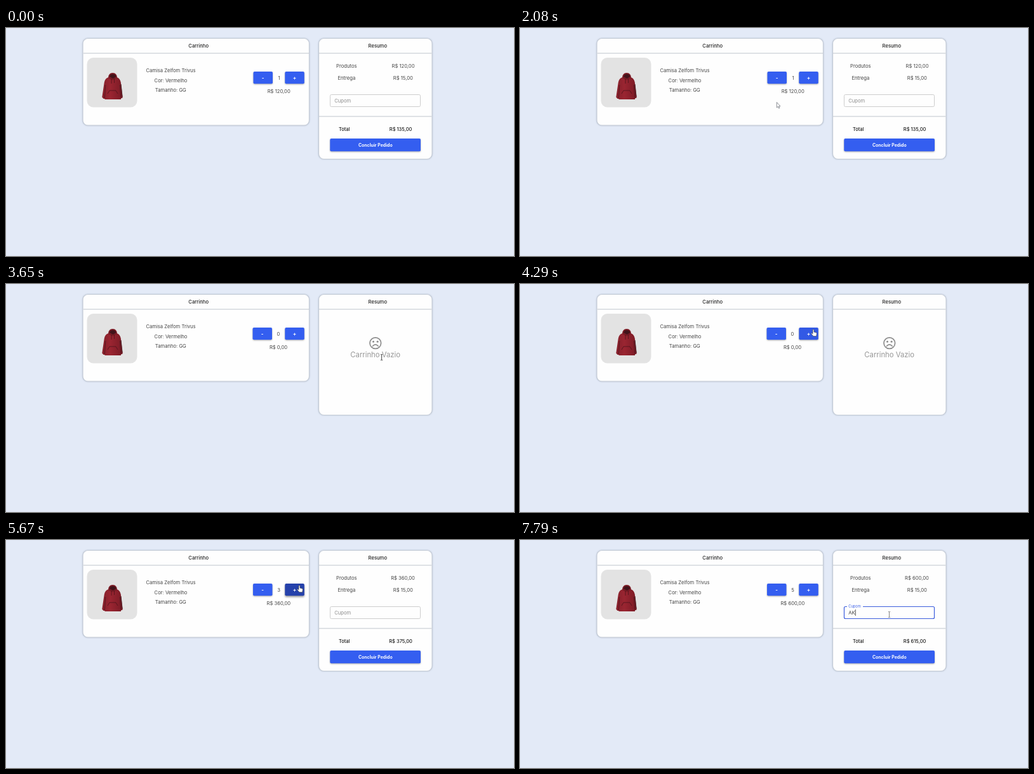
These frames come from a looping animation (800x361 px, 7.99 s). An HTML page:

```html
<!DOCTYPE html>
<html lang="pt-BR">
<head>
<meta charset="utf-8">
<title>Carrinho</title>
<style>
  html, body { margin: 0; width: 100%; height: 100%; overflow: hidden; background: #e3eaf7; }
  svg { display: block; width: 100vw; height: 100vh; }
  text { font: 400 7.65px Inter, Roboto, sans-serif; fill: #454545; text-anchor: middle; }
  .title { font-weight: 500; fill: #222; }
  .strong { font-size: 7.5px; font-weight: 500; fill: #1c1c1c; }
  .label { font-weight: 700; font-size: 6.95px; fill: #fff; }
  .sign { font-weight: 700; font-size: 8px; fill: #fff; }
  .left { text-anchor: start; }
  .card { fill: #fefefe; stroke: #c5ccd7; stroke-width: 1.2; filter: drop-shadow(0 0 1px rgba(90, 105, 130, .3)); }
  .rule { stroke: #d3d7dd; stroke-width: 1.5; }
  .btn { fill: #345ef0; filter: drop-shadow(0 1px 1px rgba(0, 0, 0, .32)); }
  .empty text { font-size: 11.3px; fill: #979797; }
  .empty .face { fill: none; stroke: #8c8c8c; stroke-width: 1.7; stroke-linecap: round; }
</style>
</head>
<body>
<svg viewBox="0 0 800 361" preserveAspectRatio="none">
  <defs>
    <linearGradient id="cloth">
      <stop offset="0" stop-color="#84202b"/>
      <stop offset=".4" stop-color="#9a2531"/>
      <stop offset="1" stop-color="#7a1a25"/>
    </linearGradient>
  </defs>
  <rect width="800" height="361" fill="#e3eaf7"/>

  <!-- cart -->
  <rect class="card" x="121" y="16.5" width="356.5" height="137.7" rx="8"/>
  <path class="rule" d="M121.5 40H477"/>
  <text class="title" x="303.2" y="31.1">Carrinho</text>
  <rect x="127.5" y="47" width="79" height="78.5" rx="10" fill="#e3e3e3"/>
  <g>
    <path fill="url(#cloth)" d="M161.5 78Q156 79.500 154.800 86L151.300 109.500L153.500 112H155.500V113H181V111.500L183.700 110.500L180.800 86Q179.500 79.500 174.500 78Z"/>
    <path fill="#7b1b25" d="M161 79.500Q161 71 168 71Q175 71 175 79.500L168 82.500Z"/>
    <path fill="#42131a" d="M163 77Q164 73 168 73Q172.500 73 173.500 77L168.500 80Z"/>
    <path fill="none" stroke="#4d131b" stroke-width=".8" d="M166 80V88M170.500 80V87M156.800 90L155.300 111M179.300 90L181 111M160 104L163 99H173L176 104"/>
    <path fill="none" stroke="#3c1a20" stroke-width=".9" d="M181 89L183.200 109"/>
  </g>
  <text x="259.5" y="70.3">Camisa Zelfom Trivus</text>
  <text x="259.5" y="85.6">Cor: Vermelho</text>
  <text x="259.3" y="100.8">Tamanho: GG</text>
  <g id="minus">
    <rect class="btn" x="389.500" y="69" width="30.500" height="19.300" rx="2"/>
    <text class="sign" x="404.7" y="81.5">-</text>
  </g>
  <g id="plus">
    <rect class="btn" x="439.300" y="69" width="30.500" height="19.300" rx="2"/>
    <text class="sign" x="454.5" y="81.6">+</text>
  </g>
  <text id="count" y="81.7"></text>
  <text id="price" y="102.600"></text>

  <!-- summary -->
  <rect class="card" x="492.5" y="16.500" width="178.500" height="191" rx="8"/>
  <path class="rule" d="M493 40H670.500"/>
  <text class="title" x="585.3" y="31.1">Resumo</text>
  <g id="full">
    <text x="536.3" y="62.6">Produtos</text>
    <text id="goods" y="62.6"></text>
    <text x="536.3" y="81.6">Entrega</text>
    <text x="625.3" y="81.6">R$ 15,00</text>
    <rect id="field" x="510.5" y="105.500" width="142" height="19" rx="2" fill="none"/>
    <rect id="gap" x="515" y="104" width="25" height="3" fill="#fefefe"/>
    <text id="hint" class="left">Cupom</text>
    <text id="typed" class="left" x="517.3" y="117.7"></text>
    <rect id="caret" y="110" width=".8" height="10" fill="#222"/>
    <path class="rule" d="M493 140H670.500"/>
    <text class="strong" x="532.7" y="162.6">Total</text>
    <text id="total" class="strong" x="621.6" y="162.6"></text>
    <rect class="btn" x="510.3" y="175" width="142.700" height="20.200" rx="2"/>
    <text class="label" x="581.8" y="187.9">Concluir Pedido</text>
  </g>
  <g id="none" class="empty">
    <circle class="face" cx="581.8" cy="93.6" r="8.8"/>
    <path class="face" d="M577.500 98.300Q581.800 93.500 586.100 98.300"/>
    <circle cx="578.500" cy="91.200" r="1.500" fill="#8c8c8c"/>
    <circle cx="585.1" cy="91.2" r="1.5" fill="#8c8c8c"/>
    <text x="581.7" y="115.6">Carrinho Vazio</text>
  </g>

  <g id="cursor" stroke-linejoin="round">
    <path id="arrow" fill="#fff" stroke="#70747c" stroke-width=".8" d="M0 0V8.500L2 6.800L3.300 9.700L4.500 9.100L3.300 6.300H5.700Z"/>
    <path id="hand" fill="#fff" stroke="#3a3f4a" stroke-width=".7" d="M-1 1Q-1-.300 0-.300T1 1V4L4.200 4.700Q5.600 5.100 5.400 6.700L4.700 10.700H0L-3 7.300Q-3.700 6-2.500 5.600L-1 6.800Z"/>
    <path id="beam" fill="none" stroke="#666" stroke-width=".9" d="M-1.600-4.500H-.5L0-4L.5-4.500H1.600M0-4V4M-1.600 4.500H-.5L0 4L.5 4.500H1.600"/>
  </g>
</svg>
<script>
const LOOP = 7990;
const el = Object.fromEntries([...document.querySelectorAll('[id]')].map(n => [n.id, n]));
const clicks = [[2940, 0], [4480, 1], [5050, 2], [5480, 3], [5970, 4], [6330, 5]];
const keys = [[910, ''], [7660, 'A'], [7790, 'AK']];
const hover = { minus: [2660, 3190], plus: [4220, 6500] };
const FOCUS = 6840;

// time, x, y of the pointer's hot spot
const route = [
  [440, 786, 292], [520, 700, 273], [600, 623, 264], [850, 623, 264],
  [1000, 606, 271], [1300, 560, 233], [1620, 375, 168], [1690, 383, 156],
  [2000, 404, 118], [2300, 424, 90], [2550, 424, 79], [2700, 414, 79],
  [3100, 414, 79], [3250, 406, 92], [3410, 405, 94], [3490, 460, 102],
  [3640, 601, 117], [3780, 600, 146], [3980, 550, 125], [4220, 462, 72],
  [6430, 462, 72], [6640, 575, 117], [6780, 581.500, 118]
];

const clamp = v => Math.max(0, Math.min(1, v));
const mix = (a, b, k) => a + (b - a) * k;
const within = (t, [a, b]) => t >= a && t < b;
const show = (node, on) => node.style.display = on ? '' : 'none';
const money = n => `R$ ${n},00`;
const latest = (list, t, first) => list.reduce((v, [at, next]) => t >= at ? next : v, first);
const blend = (a, b, k) => `rgb(${a.map((v, i) => Math.round(mix(v, b[i], k)))})`;

function snap(t) {
  const [start, size] = t < 910 ? [440, 80] : t < 3490 ? [910, 78.18] : [3490, 70];
  return t < 440 || t >= 6990 ? t : start + Math.floor((t - start) / size + .001) * size;
}

function position(t) {
  const i = route.findIndex(p => p[0] > t);
  if (i < 0) return route[route.length - 1].slice(1);
  if (i === 0) return route[0].slice(1);
  const a = route[i - 1], b = route[i], k = (t - a[0]) / (b[0] - a[0]);
  return [mix(a[1], b[1], k), mix(a[2], b[2], k)];
}

function drawButtons(t) {
  for (const id in hover) {
    const [a, b] = hover[id];
    const k = clamp((t - a) / 250) - clamp((t - b) / 250);
    const face = el[id].firstElementChild;
    face.style.fill = blend([52, 94, 240], [37, 65, 171], k);
    face.style.filter = `drop-shadow(0 ${1 + k}px ${1 + k * .7}px rgba(0,0,0,${.32 + k * .08}))`;
  }
}

function drawAmounts(t) {
  const n = latest(clicks, t, 1);
  const shift = n === 0 ? -1 : n === 1 ? 0 : -.5;
  el.minus.setAttribute('transform', `translate(${shift})`);
  el.count.setAttribute('x', 430 + shift);
  el.price.setAttribute('x', 429.7 + shift * .7);
  el.goods.setAttribute('x', 625.5 + shift);
  el.count.textContent = n;
  el.price.textContent = el.goods.textContent = money(n * 120);
  el.total.textContent = money(n * 120 + 15);
  show(el.full, n > 0);
  show(el.none, n === 0);
}

function drawField(t) {
  const k = clamp((t - FOCUS) / 150), focused = t >= FOCUS;
  const typed = latest(keys, t, '');
  el.field.setAttribute('stroke', focused ? '#3a5cdc' : t >= 6640 ? '#333' : '#cdcdcd');
  el.field.setAttribute('stroke-width', focused ? 1.2 : 1);
  show(el.gap, focused);
  el.hint.setAttribute('transform', `translate(517.2 ${mix(117.7, 107.3, k)}) scale(${mix(1, .75, k)})`);
  el.hint.style.fill = blend([140, 140, 140], [62, 98, 232], k);
  el.typed.textContent = typed;
  el.caret.setAttribute('x', 517.2 + (typed ? el.typed.getComputedTextLength() + .2 : 0));
  show(el.caret, focused && !within(t, [7330, 7660]));
}

function drawCursor(t) {
  const [x, y] = position(t);
  const hand = within(t, hover.minus) || within(t, hover.plus);
  const beam = within(t, [3600, 3740]) || t >= 6640;
  show(el.cursor, t >= 440);
  show(el.hand, hand);
  show(el.beam, beam);
  show(el.arrow, !hand && !beam);
  el.beam.setAttribute('stroke', t < 4000 ? '#333' : '#777');
  el.cursor.setAttribute('transform', `translate(${x} ${y})`);
}

function frame() {
  const t = snap(performance.now() % LOOP);
  drawButtons(t);
  drawAmounts(t);
  drawField(t);
  drawCursor(t);
  requestAnimationFrame(frame);
}
frame();
</script>
</body>
</html>
```
